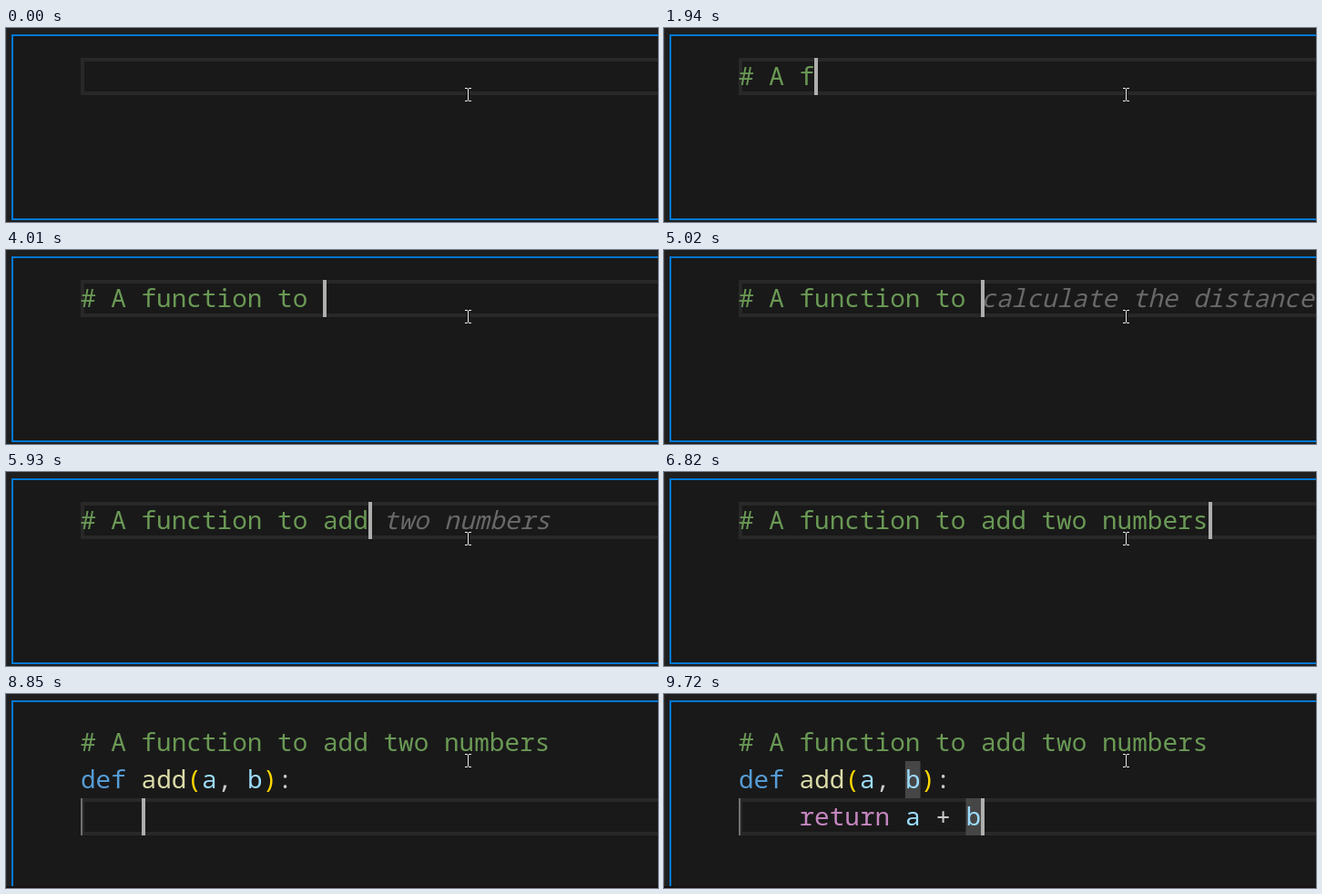
Write an HTML page with a canvas that moves like this. It is 716 px wide and 214 px high and loops after 9820 ms.

```html
<!DOCTYPE html>
<html lang="en">
<head>
<meta charset="utf-8">
<title>Code completion</title>
<style>
html, body { margin: 0; height: 100%; overflow: hidden; background: #1f1f1f; }
canvas { display: block; }
</style>
</head>
<body>
<canvas id="stage" width="716" height="214"></canvas>
<script>
const ctx = document.getElementById('stage').getContext('2d');
const LOOP = 9820, LEFT = 82, TOP = 33, CHAR = 16.63, LINE = 41;
const BG = '#191919', BLUE = '#0078d4', GREY = '#cccccc', PALE = '#9cdcfe';
const FONT = `${CHAR / 0.6}px "Noto Sans Mono", "DejaVu Sans Mono", monospace`;

const COMMENT = '# A function to add two numbers';
const DEF = [['def', '#569cd6'], [' add', '#dcdcaa'], ['(', '#ffd700'], ['a', PALE],
  [', ', GREY], ['b', PALE], [')', '#ffd700'], [':', GREY]];
const RETURN = [['    return', '#c586c0'], [' a', PALE], [' +', GREY], [' b', PALE]];

// Each event is a time and the state it changes; marks are [line, column, length].
const START = { chars: 0, line: 0, col: 0, caret: false, ghost: '', marks: [],
  spark: false, def: false, ret: false };
const typed = (t, chars, more) => [t, { chars, col: chars, caret: true, ghost: '', marks: [], ...more }];

const events = [
  [160, { caret: true }],
  typed(390, 1), typed(670, 2),
  [1130, { caret: false }],
  typed(1310, 3), typed(1480, 4), typed(1940, 5), typed(2090, 6),
  ...[7, 8, 9, 10, 11, 12].map((n, i) => typed(2230 + i * 138, n)),
  [3080, { marks: [[0, 4, 8]] }],
  typed(3250, 13), typed(3590, 14), typed(3780, 15), typed(4010, 16),
  [4470, { ghost: 'calculate the distance' }],
  [4510, { caret: false }],
  [5020, { caret: true }],
  typed(5480, 17), typed(5640, 18),
  [5790, { ghost: 'd two numbers' }],
  typed(5930, 19, { ghost: ' two numbers' }),
  [6160, { marks: [[0, 16, 3]] }],
  [6420, { caret: false }],
  typed(6780, 31),
  [7050, { spark: true, marks: [[0, 24, 7]] }],
  [7290, { caret: false }],
  [7580, { line: 1, col: 0, caret: true, spark: false, marks: [] }],
  [7720, { ghost: 'def add(a, b):' }],
  [7860, { spark: true }],
  [8070, { caret: false }],
  [8450, { def: true, col: 14, caret: true, ghost: '', spark: false }],
  [8740, { line: 2, col: 4 }],
  [8870, { ghost: 'return a + b' }],
  [9240, { caret: false }],
  [9420, { ret: true, col: 16, caret: true, ghost: '' }],
  [9650, { marks: [[2, 15, 1]] }],
  [9720, { marks: [[1, 11, 1], [2, 15, 1]] }]
];

const colX = col => LEFT + col * CHAR;
const lineY = line => TOP + line * LINE;

function rect(color, x, y, w, h) {
  ctx.fillStyle = color;
  ctx.fillRect(x, y, w, h);
}

function write(text, line, col, color, style = '') {
  ctx.font = `${style} ${FONT}`;
  ctx.fillStyle = color;
  ctx.fillText(text, colX(col), lineY(line) + 30);
}

function writeTokens(tokens, line) {
  let col = 0;
  for (const [text, color] of tokens) {
    write(text, line, col, color);
    col += text.length;
  }
}

function star(x, y, r) {
  const k = r * 0.25;
  ctx.beginPath();
  ctx.moveTo(x, y - r);
  ctx.quadraticCurveTo(x + k, y - k, x + r, y);
  ctx.quadraticCurveTo(x + k, y + k, x, y + r);
  ctx.quadraticCurveTo(x - k, y + k, x - r, y);
  ctx.quadraticCurveTo(x - k, y - k, x, y - r);
  ctx.closePath();
  ctx.fillStyle = ctx.strokeStyle = '#d0d1d6';
  ctx.lineWidth = 2.4;
  ctx.lineJoin = 'round';
  ctx.fill();
  ctx.stroke();
}

function drawCell(grown) {
  rect('#1f1f1f', 0, 0, 716, 214);
  rect('#2b2b2b', 0, 0, 1, 214);
  rect(BLUE, 6, 7, 710, grown ? 207 : 205);
  rect(BG, 8, 9, 708, grown ? 205 : 201);
  if (grown) rect('#141014', 0, 212, 716, 2);
}

function drawPointer() {
  rect('#101010', 506, 65, 3, 16);
  rect('#f0f0f0', 507, 67, 1, 13);
  for (const y of [66, 80]) {
    rect('#f0f0f0', 504, y, 3, 1);
    rect('#f0f0f0', 508, y, 3, 1);
  }
}

function draw(s) {
  const y = lineY(s.line);
  drawCell(s.line > 0);
  ctx.strokeStyle = '#282828';
  ctx.lineWidth = 4;
  ctx.strokeRect(LEFT + 2, y + 2, 700, LINE - 4);
  if (s.line === 2) rect('#707070', LEFT, y, 2, LINE);
  for (const [line, col, n] of s.marks) rect('#464646', colX(col), lineY(line), n * CHAR, LINE);

  write(COMMENT.slice(0, s.chars), 0, 0, '#6a9955');
  if (s.def) writeTokens(DEF, 1);
  if (s.ret) writeTokens(RETURN, 2);
  write(s.ghost, s.line, s.col, '#686868', 'italic');
  if (s.spark) {
    rect('rgba(25,25,25,0.7)', LEFT, TOP, 34, LINE);
    star(95, 46, 11);
    star(109, 58.5, 5.5);
  }
  if (s.caret) rect('#aeafad', Math.round(colX(s.col)), y, 4, LINE);
  drawPointer();
}

function frame() {
  const t = performance.now() % LOOP;
  const past = events.filter(([at]) => at <= t).map(([, change]) => change);
  draw(Object.assign({}, START, ...past));
  requestAnimationFrame(frame);
}
frame();
</script>
</body>
</html>
```
